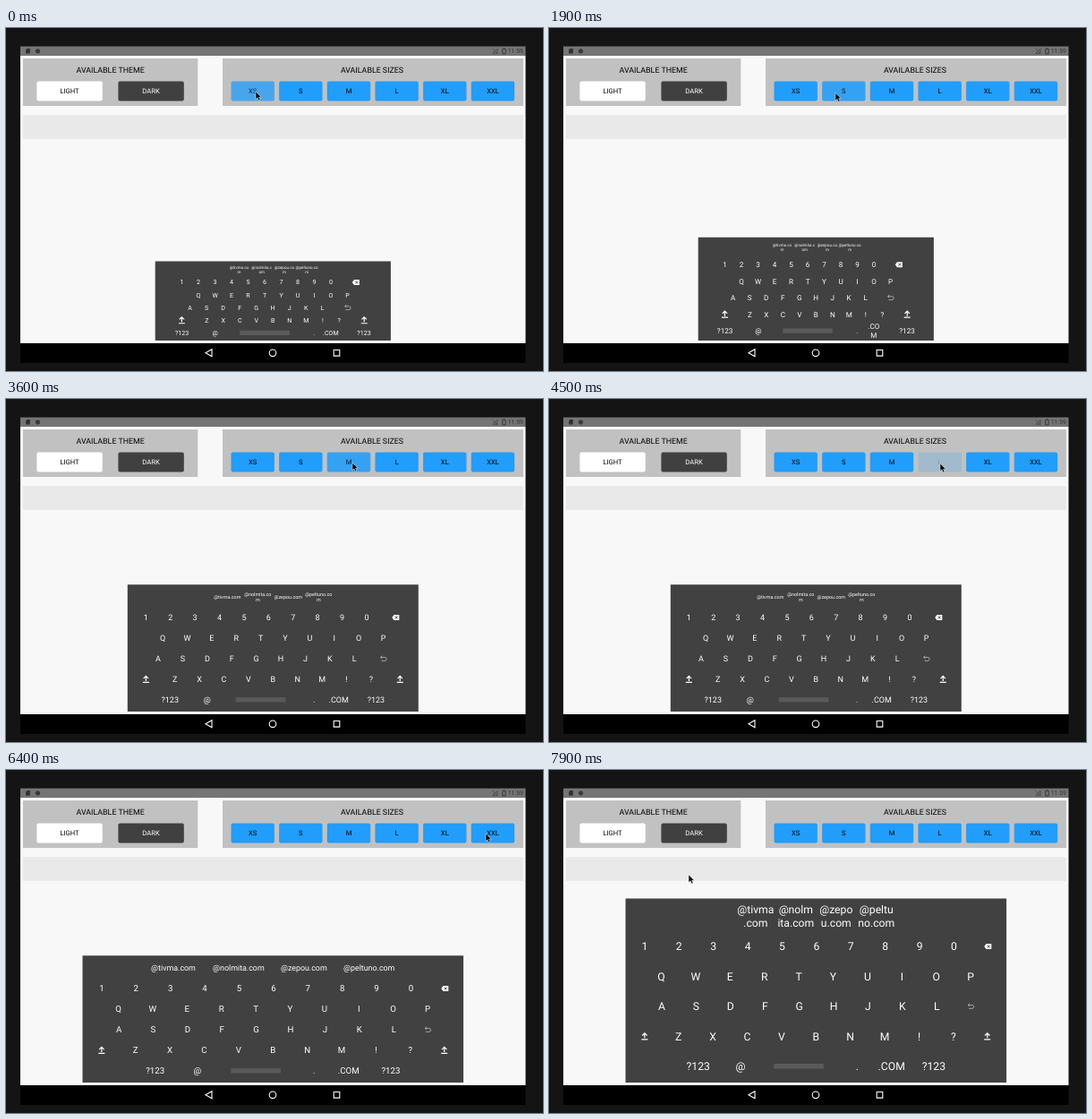
Recreate the animation shown at these times as an HTML page with a canvas. Size 600 by 383 pixels, loop 8000 ms.

```html
<!DOCTYPE html>
<html lang="en">
<head>
<meta charset="utf-8">
<title>Keyboard sizes</title>
<style>
html, body { margin: 0; width: 100%; height: 100%; overflow: hidden; background: #141414; }
canvas { display: block; width: 600px; height: 383px; }
</style>
</head>
<body>
<canvas id="stage"></canvas>
<script>
const LOOP = 8000, STEP = 100, CENTER = 298.3, WIDE = 37.3;
const canvas = document.getElementById('stage');
const ctx = canvas.getContext('2d');
const ratio = window.devicePixelRatio || 1;
canvas.width = 600 * ratio;
canvas.height = 383 * ratio;

const mails = ['@tivma.com', '@nolmita.com', '@zepou.com', '@peltuno.com'];

// key: letter key width, row: row pitch, cuts: where each mail label wraps (0 = one line)
const small = { width: 263.2, key: 18.5, mailSize: 4.5, mailX: 260.5, mailStep: 25.2, cuts: [9, 10, 9, 11] };
const medium = { top: 207.3, row: 23, mailY: 221.3 };
const layouts = {
  XS: { ...small, top: 260.4, row: 14.1, font: 7.1, mailY: 269.6 },
  S: { ...small, top: 233.8, row: 18.5, font: 8.1, mailY: 245.2 },
  M: { ...medium, width: 325, key: 27.4, font: 9, mailSize: 5.4, mailX: 247.3, mailStep: 34, cuts: [0, 11, 0, 11] },
  L: { ...medium, width: 392.5, key: 34.9, font: 9.7, mailSize: 8.85, mailX: 200.2, mailStep: 64.1, cuts: [0, 0, 0, 0] },
  XL: { ...medium, width: 425.6, key: 38.4, font: 9.7, mailSize: 8.9, mailX: 187, mailStep: 72.9, cuts: [0, 0, 0, 0] },
  XXL: { width: 425.6, key: 38.4, top: 143.5, row: 33.4, font: 12.2, mailY: 163.2,
    mailSize: 12.2, mailX: 230.8, mailStep: 45, cuts: [6, 5, 5, 6] }
};

// When each size button goes down and is let go; its keyboard appears one step later.
const presses = {
  XS: [-900, -220], S: [1200, 1600], M: [2800, 3300],
  L: [4200, 4700], XL: [5300, 5800], XXL: [6400, 6900]
};

const pointerPath = [
  [0, 279, 71], [500, 275, 71], [600, 275, 71], [1200, 320, 72.5], [2300, 320, 72.5],
  [2900, 384, 71], [3500, 384, 71], [4200, 437, 72], [4900, 437, 72], [5300, 493, 77],
  [5600, 491, 75], [5900, 491, 75], [6400, 536, 71], [7000, 549, 70], [7600, 549, 70], [7900, 156, 117]
];

const clamp = v => Math.max(0, Math.min(1, v));
const smooth = p => p * p * (3 - 2 * p);

function rect(x, y, w, h, color, radius = 0) {
  ctx.fillStyle = color;
  ctx.beginPath();
  ctx.roundRect(x, y, w, h, radius);
  ctx.fill();
}

function label(text, x, y, size, color = '#fff') {
  ctx.font = `${size}px Roboto, sans-serif`;
  ctx.textAlign = 'center';
  ctx.fillStyle = color;
  ctx.fillText(text, x, y + size * 0.355);
}

function lines(parts, x, y, size, pitch) {
  parts.forEach((part, i) => label(part, x, y + (i - (parts.length - 1) / 2) * pitch, size));
}

function icon(path, x, y, { stroke, fill, width = 1 }) {
  const shape = new Path2D(path);
  ctx.save();
  ctx.translate(x, y);
  if (fill) { ctx.fillStyle = fill; ctx.fill(shape); }
  if (stroke) { ctx.strokeStyle = stroke; ctx.lineWidth = width; ctx.stroke(shape); }
  ctx.restore();
}

function backspace(x, y) {
  icon('M-4 0L-1.8 -3H4V3H-1.8Z', x, y, { fill: '#fff' });
  icon('M-.6 -1.5L2.4 1.5M2.4 -1.5L-.6 1.5', x, y, { stroke: '#414141', width: 0.9 });
}

function enter(x, y) {
  icon('M-3 -1.5H1.5A2 2 0 0 1 1.5 2.5H-2M-1.2 -3.2L-3 -1.5L-1.2 .2', x, y, { stroke: '#bbb', width: 0.8 });
}

function shift(x, y) {
  icon('M0 -3.4V2M-2.7 -.8L0 -3.5L2.7 -.8M-3.5 3.5H3.5', x, y, { stroke: '#fff', width: 1.2 });
}

function opacity(name, t) {
  const [down, up] = presses[name];
  if (t < down) return 1;
  if (t < up) return 1 - 0.8 * clamp((t - down) / 300);
  const left = 1 - clamp((t - up) / 500);
  return 1 - 0.8 * left * left;
}

function drawScreen() {
  rect(0, 0, 600, 383, '#141414');
  rect(16, 20.5, 564.5, 10.5, '#757575');
  rect(16, 31, 564.5, 321, '#f8f8f8');
  rect(16, 352, 564.5, 22, '#000');

  icon('M-2.3 -1.2L-1 -2.7H2.3V2.7H-2.3Z', 24.5, 25.8, { fill: '#303030' });
  icon('M-2.6 0A2.6 2.6 0 1 0 2.6 0A2.6 2.6 0 1 0 -2.6 0Z', 35.5, 25.8, { fill: '#3a3a3a' });
  icon('M-2.5 2.5L2.5 -2.5V2.5ZM-3 -2.5L3 3', 546.5, 25.8, { stroke: '#444', width: 0.8 });
  icon('M-1.7 -2.2H-.7V-3H.7V-2.2H1.7V3H-1.7Z', 556.5, 25.8, { stroke: '#333', width: 0.9 });
  label('11:59', 569.3, 26, 6.9, '#333');

  icon('M3.5 -4V4L-3.5 0Z', 226.5, 362.8, { stroke: '#fff', width: 1.1 });
  icon('M-3.8 0A3.8 3.8 0 1 0 3.8 0A3.8 3.8 0 1 0 -3.8 0Z', 298, 362.8, { stroke: '#fff', width: 1.1 });
  icon('M-3.3 -3.3H3.3V3.3H-3.3Z', 369.5, 362.8, { stroke: '#fff', width: 1.1 });

  rect(19, 34, 195.3, 53, '#c1c1c1');
  label('AVAILABLE THEME', 116.7, 46.5, 8.85, '#000');
  rect(34.4, 59.4, 73.3, 22.1, '#fff', 2);
  label('LIGHT', 71, 70.7, 7.6, '#000');
  rect(125.4, 59.4, 73.4, 22.1, '#404040', 2);
  label('DARK', 162, 70.7, 7.6);

  rect(242, 34, 336, 53, '#c1c1c1');
  label('AVAILABLE SIZES', 409, 46.5, 8.85, '#000');
  rect(19, 97.2, 559, 26.5, '#e9e9e9');
}

function drawSizes(t) {
  Object.keys(layouts).forEach((name, i) => {
    const x = 275.7 + i * 53.65;
    ctx.globalAlpha = opacity(name, t);
    rect(x - 24.2, 59.4, 48.4, 22.1, '#219dfb', 2);
    label(name, x, 70.7, 7.6, '#000');
  });
  ctx.globalAlpha = 1;
}

function drawKeyboard(k) {
  rect(CENTER - k.width / 2, k.top, k.width, 349 - k.top, '#414141');

  mails.forEach((mail, i) => {
    const cut = k.cuts[i];
    const parts = cut ? [mail.slice(0, cut), mail.slice(cut)] : [mail];
    lines(parts, k.mailX + i * k.mailStep, k.mailY, k.mailSize, k.mailSize * 1.17);
  });

  const text = (s, width = k.key) => [width, (x, y) => label(s, x, y, k.font)];
  const letters = s => [...s].map(c => text(c));
  const special = draw => [WIDE, draw];
  const dotCom = (x, y) => lines(k === layouts.S ? ['.CO', 'M'] : ['.COM'], x, y, k.font, 9.2);
  const space = (x, y) => rect(x - 27.8, y - 2.7, 55.6, 5.4, '#5a5a5a');

  const rows = [
    [...letters('1234567890'), special(backspace)],
    letters('QWERTYUIOP'),
    [...letters('ASDFGHJKL'), special(enter)],
    [special(shift), ...letters('ZXCVBNM!?'), special(shift)],
    [text('?123', WIDE * 1.5), text('@'), [92, space], text('.'), [k.key, dotCom], text('?123', WIDE * 1.5)]
  ];
  rows.forEach((row, i) => {
    const y = 347.4 - (4.5 - i) * k.row;
    let x = CENTER - row.reduce((sum, [width]) => sum + width, 0) / 2;
    for (const [width, draw] of row) {
      draw(x + width / 2, y);
      x += width;
    }
  });
}

function drawPointer(t) {
  const next = pointerPath.findIndex(p => p[0] > t);
  const b = pointerPath.at(next);
  const a = next > 0 ? pointerPath[next - 1] : b;
  const p = b === a ? 0 : smooth((t - a[0]) / (b[0] - a[0]));
  icon('M0 0V8.6L2 6.8L3.4 10L5 9.3L3.6 6.2H6.3Z', a[1] + (b[1] - a[1]) * p, a[2] + (b[2] - a[2]) * p,
    { stroke: 'rgba(255,255,255,.7)', fill: '#000', width: 0.7 });
}

function render(now) {
  const t = Math.floor((now % LOOP) / STEP) * STEP;
  ctx.setTransform(ratio, 0, 0, ratio, 0, 0);
  ctx.textRendering = 'geometricPrecision';
  drawScreen();
  drawSizes(t);
  const active = Object.keys(layouts).filter(name => t >= presses[name][1] + STEP).pop();
  drawKeyboard(layouts[active]);
  drawPointer(t);
}

const start = performance.now();
function tick() {
  render(performance.now() - start);
  requestAnimationFrame(tick);
}
tick();
</script>
</body>
</html>
```
